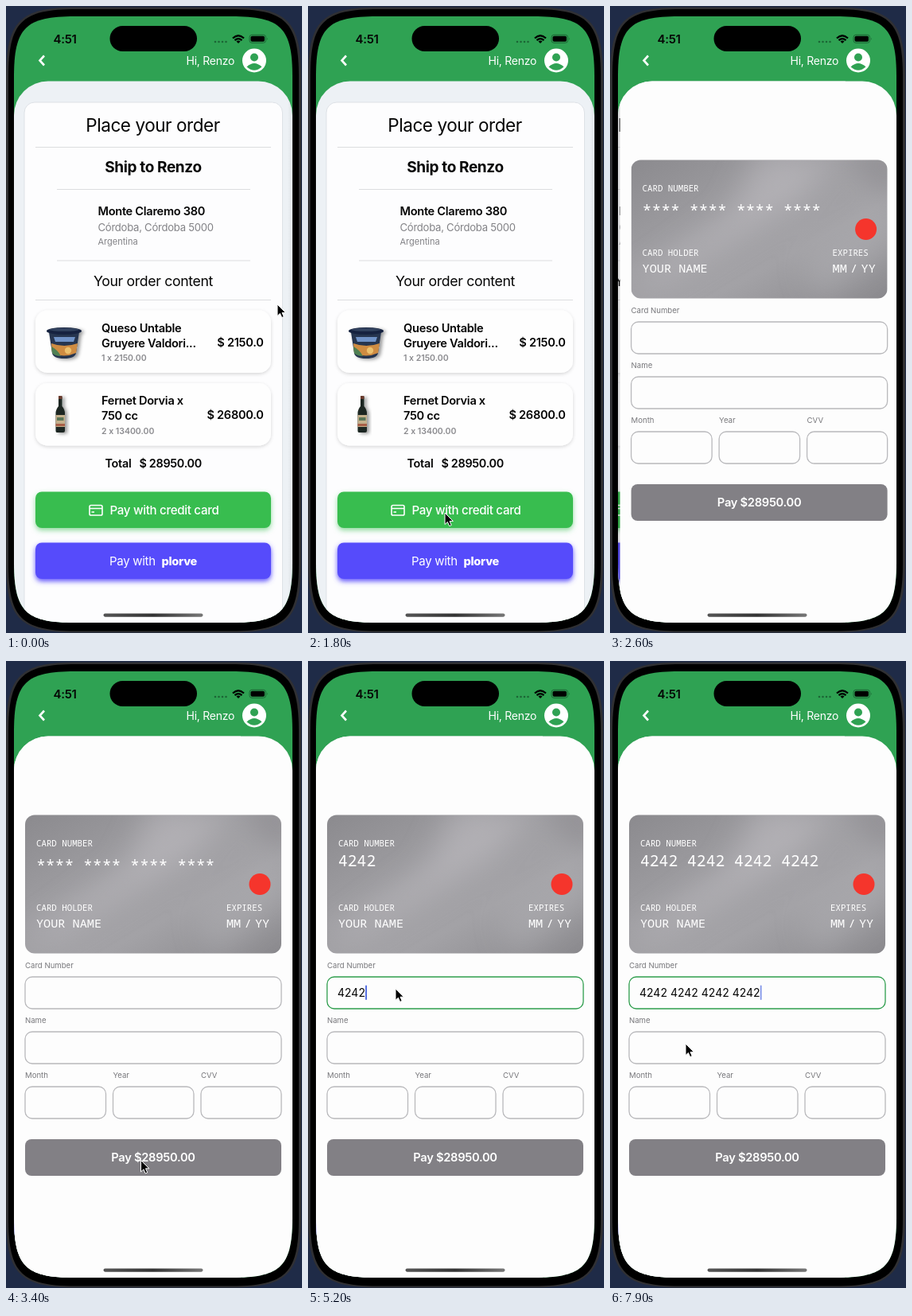
These frames come from a looping animation (372x788 px, 8 s). An HTML page:

```html
<!DOCTYPE html>
<html lang="es">
<head>
<meta charset="utf-8">
<style>
  html, body { margin: 0; width: 100%; height: 100%; overflow: hidden; background: #1f2b47; }
  svg { display: block; width: 372px; height: 788px; }
  text { font-family: Inter, "Liberation Sans", sans-serif; letter-spacing: -.02em; white-space: pre; }
  .plain { letter-spacing: 0; }
  .mono { font-family: "Noto Sans Mono", "DejaVu Sans Mono", monospace; letter-spacing: 0; fill: #fff; }
</style>
</head>
<body>
<svg id="stage" viewBox="0 0 372 788" xmlns="http://www.w3.org/2000/svg"></svg>
<script>
const LOOP = 8000, STEP = 100;
const PUSH_START = 2218, FOCUS = 4300, TYPE_START = 4700, KEY_GAP = 150;
const DIGITS = "4242424242424242";
const stage = document.getElementById("stage");

const text = (x, y, size, content, { weight = 400, fill = "#050505", anchor = "start", cls = "", id = "" } = {}) =>
  `<text x="${x}" y="${y}" font-size="${size}" font-weight="${weight}" fill="${fill}" text-anchor="${anchor}" class="${cls}" id="${id}">${content}</text>`;
const mono = (x, y, size, content, id = "") => text(x, y, size, content, { cls: "mono", id });
const rect = (x, y, w, h, r, attrs) => `<rect x="${x}" y="${y}" width="${w}" height="${h}" rx="${r}" ${attrs}/>`;
const rule = (x1, x2, y) => `<path d="M${x1} ${y}H${x2}" stroke="#dcdddf"/>`;

// Rounded rectangle with continuous-curvature corners
function smoothRect(x, y, w, h, r, attrs = "") {
  const e = 1.5 * r, c = 0.28 * r, X = x + w, Y = y + h;
  return `<path ${attrs} d="M${x + e} ${y}H${X - e}C${X - c} ${y} ${X} ${y + c} ${X} ${y + e}
    V${Y - e}C${X} ${Y - c} ${X - c} ${Y} ${X - e} ${Y}
    H${x + e}C${x + c} ${Y} ${x} ${Y - c} ${x} ${Y - e}
    V${y + e}C${x} ${y + c} ${x + c} ${y} ${x + e} ${y}Z"/>`;
}

const bold = { weight: 600 };
const centered = { anchor: "middle" };
const boldEnd = { weight: 600, anchor: "end" };
const note = { weight: 600, fill: "#8a8a8e", cls: "plain" };

const defs = `<defs>
  <clipPath id="screen">${smoothRect(10, 13, 350, 762, 51)}</clipPath>
  <clipPath id="panel">${rect(10, 94.5, 350, 760, 43, "")}</clipPath>
  <clipPath id="cardShape">${rect(24, 193.5, 322, 174, 12, "")}</clipPath>
  <linearGradient id="metal" x2="1" y2="1">
    <stop offset="0" stop-color="#8b8a8e"/><stop offset=".4" stop-color="#a09fa3"/>
    <stop offset=".65" stop-color="#a3a2a6"/><stop offset="1" stop-color="#8a898d"/>
  </linearGradient>
  <linearGradient id="edge"><stop offset="0" stop-opacity="0"/><stop offset="1" stop-opacity=".06"/></linearGradient>
  <linearGradient id="bar">
    <stop offset="0" stop-color="#555"/><stop offset=".5" stop-color="#333"/><stop offset="1" stop-color="#777"/>
  </linearGradient>
  <filter id="blur" x="-50%" y="-50%" width="200%" height="200%"><feGaussianBlur stdDeviation="18"/></filter>
  <filter id="soft" x="-10%" y="-20%" width="120%" height="150%"><feDropShadow dx="0" dy="1.5" stdDeviation="2" flood-opacity=".16"/></filter>
  <filter id="green" x="-10%" y="-30%" width="120%" height="180%"><feDropShadow dx="0" dy="3" stdDeviation="3" flood-color="#39bd50" flood-opacity=".55"/></filter>
  <filter id="violet" x="-10%" y="-30%" width="120%" height="180%"><feDropShadow dx="0" dy="3" stdDeviation="3.4" flood-color="#574cfb" flood-opacity=".95"/></filter>
  <filter id="cast" x="-30%" y="-20%" width="180%" height="150%"><feDropShadow dx="3" dy="1.5" stdDeviation="2" flood-opacity=".4"/></filter>
</defs>`;

const tub = `<g filter="url(#cast)">
  <path d="M54 410L58 436Q59 443 73 443T88 436L92 410Z" fill="#263550"/>
  <path d="M57 424Q73 430 90 424L88 436Q73 443 58 436Z" fill="#cf8c43"/>
  <path d="M57 428Q65 432 69 440Q61 440 58 436Z" fill="#4f8052"/>
  <path d="M60 416H87L85 422H62Z" fill="#6f93c8"/>
  <circle cx="78" cy="433" r="4.200" fill="#ecc06d"/>
  <ellipse cx="73" cy="408.500" rx="22" ry="4.600" fill="#17243f"/>
  <ellipse cx="73" cy="406.800" rx="18.500" ry="2" fill="#33435f"/>
</g>`;

const bottle = `<g filter="url(#cast)">
  <path d="M66 491h4.500v12q3.500 4 3.500 9v22q0 2-2 2H64q-1.500 0-1.500-2V512q0-5 3.500-9Z" fill="#1d2820"/>
  <path d="M66 490h4.500v4H66z" fill="#6b3a2f"/>
  <path d="M62.500 514H74v15H62.500z" fill="#c4b08c"/>
  <path d="M64 517h8.500v4H64z" fill="#5a7458"/><path d="M62.500 525H74v3H62.500z" fill="#a8604a"/>
</g>`;

const orderPage = `
  ${rect(-40, 94, 440, 700, 0, 'fill="#edf1f5"')}
  ${rect(23, 121, 324.5, 700, 13, 'fill="#fdfdfe" stroke="#dde1e6"')}
  ${text(184.5, 158, 22.5, "Place your order", centered)}
  ${rule(37, 333, 177.5)}
  ${text(185, 209, 19, "Ship to Renzo", { weight: 700, anchor: "middle" })}
  ${rule(64, 307, 230.5)}
  ${text(115.5, 262.5, 14.6, "Monte Claremo 380", bold)}
  ${text(115.5, 282.5, 13.1, "Córdoba, Córdoba 5000", { fill: "#828286" })}
  ${text(115.5, 299.5, 11, "Argentina", { fill: "#828286", cls: "plain" })}
  ${rule(64, 307, 320)}
  ${text(185, 351.5, 17.7, "Your order content", centered)}
  ${rule(37, 333, 369.5)}
  ${rect(37, 382.5, 296, 78.5, 15, 'fill="#fefefe" filter="url(#soft)"')}
  ${tub}
  ${text(120, 409.5, 14.6, "Queso Untable", bold)}
  ${text(120, 428.5, 14.6, "Gruyere Valdori...", bold)}
  ${text(120, 446, 10.5, "1 x 2150.00", note)}
  ${text(323.5, 427.5, 14.6, "$ 2150.0", boldEnd)}
  ${rect(37, 474, 296, 78.5, 15, 'fill="#fefefe" filter="url(#soft)"')}
  ${bottle}
  ${text(120, 501, 14.6, "Fernet Dorvia x", bold)}
  ${text(120, 520, 14.6, "750 cc", bold)}
  ${text(120, 537.5, 10.5, "2 x 13400.00", note)}
  ${text(323.5, 519, 14.6, "$ 26800.0", boldEnd)}
  ${text(124.5, 580, 14.4, "Total", bold)}
  ${text(246, 580, 14.4, "$ 28950.00", boldEnd)}
  ${rect(37, 610.5, 296, 45.5, 8, 'fill="#39bd50" filter="url(#green)"')}
  <g fill="none" stroke="#fff" stroke-width="1.6">
    ${rect(105, 627.5, 16, 12.5, 1.8, "")}<path d="M105 631.500H121M107.500 636H111"/>
  </g>
  ${text(130.5, 638.5, 15.1, "Pay with credit card", { weight: 500, fill: "#fff" })}
  ${rect(37, 674.5, 296, 45.5, 8, 'fill="#574cfb" filter="url(#violet)"')}
  ${text(130, 702.5, 15, "Pay with", { fill: "#fff" })}
  ${text(195.5, 702.5, 14.6, "plorve", { weight: 800, fill: "#fff" })}`;

const field = (x, y, w, label, id = "") =>
  text(x, y - 11.5, 9.6, label, { fill: "#77777b", cls: "plain" }) +
  rect(x, y, w, 40, 9, `fill="#fdfdfd" stroke="#b9b9bc" stroke-width="1.3" id="${id}"`);

const payPage = `
  ${rect(4, 94, 6, 700, 0, 'fill="url(#edge)"')}
  ${rect(10, 94, 350, 700, 0, 'fill="#fdfdfd"')}
  <g clip-path="url(#cardShape)">
    ${rect(24, 193, 322, 175, 0, 'fill="url(#metal)"')}
    <g filter="url(#blur)">
      <path d="M185 180L280 190L235 245L60 350L20 355L150 260Z" fill="#c3c2c5" opacity=".5"/>
      <path d="M240 320L360 240V300L260 375Z" fill="#c3c2c5" opacity=".3"/>
      <path d="M290 180H360V250Z" fill="#7c7b7f" opacity=".45"/>
    </g>
  </g>
  ${mono(38, 233, 10.75, "CARD NUMBER")}
  ${mono(38, 258, 19.7, "", "cardNumber")}
  <circle cx="319" cy="280.500" r="13.500" fill="#f5352c"/>
  ${mono(38, 314, 10.75, "CARD HOLDER")}
  ${mono(38, 335, 15.2, "YOUR NAME")}
  ${mono(277, 314, 10.75, "EXPIRES")}
  ${mono(277, 335, 15.2, "MM")}${mono(299.5, 335, 15.2, "/")}${mono(313, 335, 15.2, "YY")}
  ${field(24, 397, 322, "Card Number", "numberBox")}
  ${field(24, 466, 322, "Name")}
  ${field(24, 535, 101.5, "Month")}
  ${field(134.5, 535, 101.5, "Year")}
  ${field(245, 535, 101, "CVV")}
  ${text(37, 422, 14, "", { cls: "plain", id: "typed" })}
  ${rect(0, 407.5, 1.8, 18.5, 0.9, 'fill="#4663e0" id="caret"')}
  ${rect(24, 601, 322, 46, 8, 'fill="#828085"')}
  ${text(185, 629, 14.7, "Pay $28950.00", { weight: 600, fill: "#fff", anchor: "middle" })}`;

const header = `
  ${text(59.5, 47, 15, "4:51", bold)}
  ${rect(130.5, 25, 109.5, 32, 16, "")}
  <g fill="#1c6535">${[263, 267.5, 272, 276.5].map(x => `<circle cx="${x}" cy="45" r="1.300"/>`).join("")}</g>
  <g fill="none" stroke="#000" stroke-width="2.300">
    <path d="M285 40.500Q292 34 299 40.500M287.500 43.200Q292 39 296.500 43.200"/>
  </g>
  <path d="M289.500 44.500Q292 42.500 294.500 44.500L292 47Z"/>
  ${rect(306, 36.3, 20.5, 10, 3, 'fill="none" stroke="#1c6535"')}
  ${rect(307.5, 37.8, 17.5, 7, 1.8, "")}
  <path d="M328 39.500q1.500 1.800 0 3.600z" fill="#1c6535"/>
  <path d="M48 62.500L42.500 68.500L48 74.500" fill="none" stroke="#fff" stroke-width="2.600"/>
  ${text(287, 74, 14, "Hi, Renzo", { fill: "#fff", anchor: "end" })}
  <circle cx="312" cy="68.500" r="15" fill="#fff"/>
  <circle cx="312" cy="64.500" r="5" fill="#2fa253"/>
  <path d="M302.500 76.500Q312 67.500 321.500 76.500Q312 85 302.500 76.500Z" fill="#2fa253"/>`;

stage.innerHTML = `${defs}
  ${rect(0, 0, 372, 788, 0, 'fill="#1f2b47"')}
  ${smoothRect(0, 1.5, 371, 786, 60, 'fill="#303033"')}
  ${smoothRect(3, 4, 365, 781.5, 57, 'fill="#000"')}
  <g clip-path="url(#screen)">
    ${rect(10, 13, 350, 762, 0, 'fill="#2fa253"')}
    <g clip-path="url(#panel)">
      <g id="orderPage">${orderPage}</g>
      ${rect(10, 94, 350, 700, 0, 'id="dim"')}
      <g id="payPage">${payPage}</g>
    </g>
    ${header}
    ${rect(122.5, 763.5, 125, 4.2, 2.1, 'fill="url(#bar)"')}
  </g>
  <path id="pointer" d="M0 0V14.500L3.400 11.400L5.700 16.600L8.200 15.500L6 10.400H10.400Z" stroke="#fff" stroke-width="1"/>`;

const part = Object.fromEntries([...stage.querySelectorAll("[id]")].filter(e => e.id).map(e => [e.id, e]));

// Pointer stops: time, x, y
const firstTrip = [[0, 341, 375], [300, 341, 375], [1400, 172, 637]];
const secondTrip = [[3300, 172, 637], [4100, 114, 415], [4700, 114, 415], [5400, 109, 411], [7000, 109, 411], [7700, 95, 481]];

function along(stops, t) {
  const next = stops.findIndex(s => s[0] > t);
  if (next < 0) return stops[stops.length - 1].slice(1);
  const [a, b] = [stops[next - 1], stops[next]];
  const u = (t - a[0]) / (b[0] - a[0]), k = u * u * (3 - 2 * u);
  return [a[1] + (b[1] - a[1]) * k, a[2] + (b[2] - a[2]) * k];
}

// Critically damped spring
function pushProgress(t) {
  const w = Math.max(0, t - PUSH_START) / 1000 * 18.26;
  return 1 - (1 + w) * Math.exp(-w);
}

function caretOpacity(idle) {
  const p = idle % 1000;
  if (p < 500) return 1;
  return Math.max(0, 1 - (p - 500) / 150, (p - 850) / 150);
}

function render(t) {
  const p = pushProgress(t);
  part.orderPage.setAttribute("transform", `translate(${-105 * p} 0)`);
  part.payPage.setAttribute("transform", `translate(${350 * (1 - p)} 0)`);
  part.dim.setAttribute("opacity", 0.1 * p);

  const typedCount = Math.max(0, Math.min(DIGITS.length, Math.floor((t - TYPE_START) / KEY_GAP) + 1));
  const number = DIGITS.slice(0, typedCount).replace(/(.{4})(?=.)/g, "$1 ");
  part.typed.textContent = number;
  part.cardNumber.textContent = number || "**** **** **** ****";
  part.cardNumber.setAttribute("y", number ? 258 : 263.5);

  const focused = t >= FOCUS;
  const lastKey = typedCount ? TYPE_START + (typedCount - 1) * KEY_GAP : FOCUS;
  part.numberBox.setAttribute("stroke", focused ? "#2f9e4d" : "#b9b9bc");
  part.caret.setAttribute("x", 37.2 + (number ? part.typed.getComputedTextLength() : 0));
  part.caret.setAttribute("opacity", focused ? caretOpacity(t - lastKey) : 0);

  const hidden = t >= 2250 && t < 3300;
  const [x, y] = along(t < 3300 ? firstTrip : secondTrip, t);
  part.pointer.setAttribute("transform", `translate(${x} ${y})`);
  part.pointer.setAttribute("visibility", hidden ? "hidden" : "visible");
}

const start = performance.now();
function tick() {
  const t = (performance.now() - start) % LOOP;
  render(Math.floor(t / STEP) * STEP);
  requestAnimationFrame(tick);
}
tick();
</script>
</body>
</html>
```
